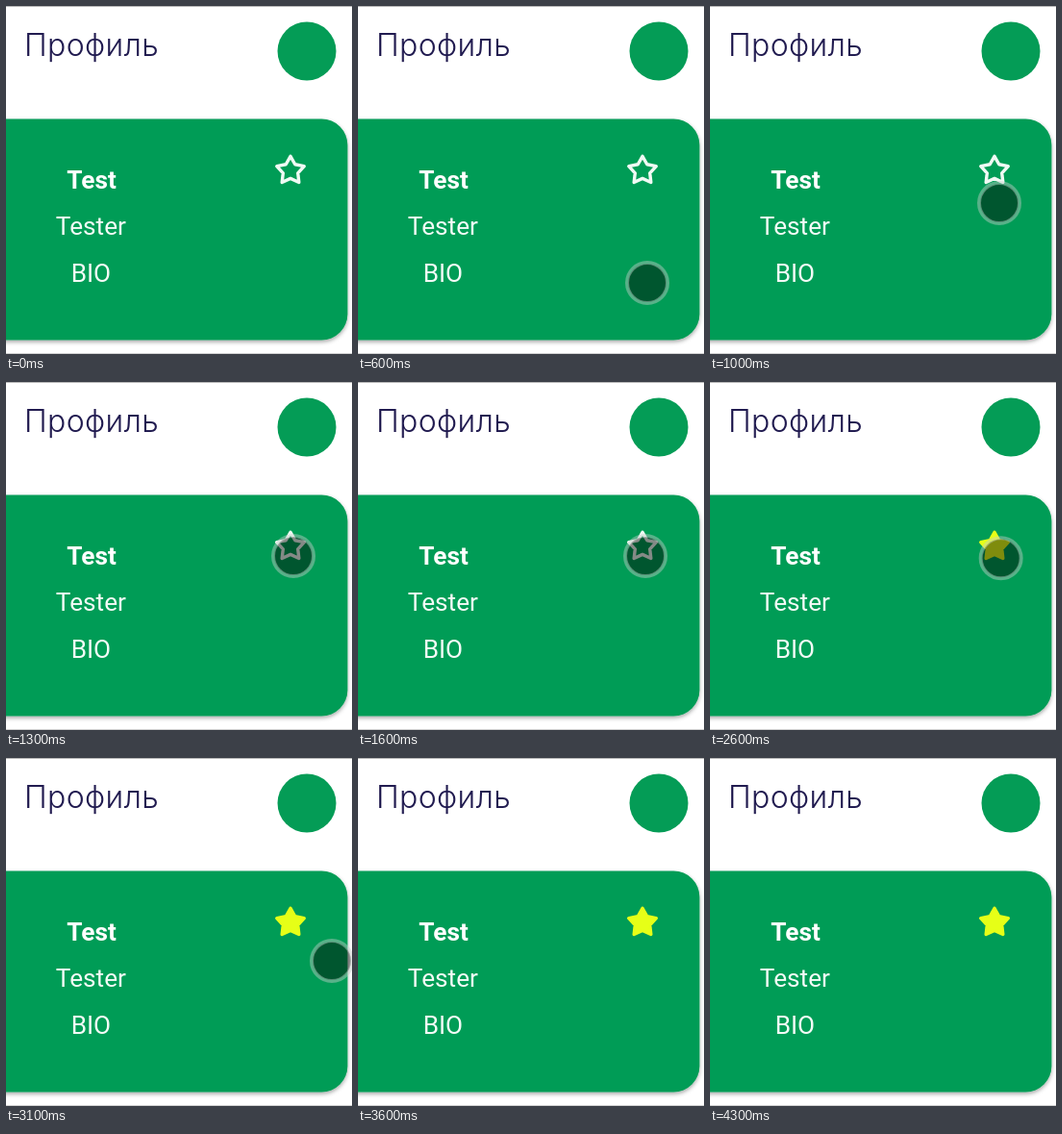
An HTML page that plays this animation: 360 px wide and 362 px high, repeating every 4.5 s.

```html
<!DOCTYPE html>
<html lang="ru">
<head>
<meta charset="utf-8">
<title>Профиль</title>
<style>
  html, body { margin: 0; width: 100%; height: 100%; overflow: hidden; background: #fff; }
  svg { display: block; width: 100%; height: 100%; }
  .title { font: 300 32px Inter, sans-serif; letter-spacing: .4px; fill: #211b50; }
  .info { font: 400 26.2px Roboto, sans-serif; fill: #f4fbf7; text-anchor: middle; }
  .name { font-weight: 700; fill: #fff; }
</style>
</head>
<body>
<svg viewBox="0 0 360 362">
  <defs>
    <filter id="shadow" x="-10%" y="-10%" width="120%" height="120%">
      <feDropShadow dx="0" dy="2" stdDeviation="2" flood-color="#000" flood-opacity=".35"/>
    </filter>
  </defs>
  <rect width="360" height="362" fill="#fff"/>
  <rect width="360" height="1" fill="#bdbdbd"/>
  <rect y="361" width="360" height="1" fill="#d4d4d4"/>
  <text class="title" x="19" y="52">Профиль</text>
  <circle cx="313" cy="47" r="30.5" fill="#049c56"/>
  <rect x="-40" y="117.5" width="395.4" height="230" rx="27" fill="#049c56" filter="url(#shadow)"/>
  <g class="info">
    <text class="name" x="89" y="190">Test</text>
    <text x="88.4" y="238">Tester</text>
    <text x="88.4" y="287">BIO</text>
  </g>
  <path id="star" stroke-width="3.4" stroke-linejoin="round"/>
  <g id="pointer">
    <circle r="20" fill="#000" fill-opacity=".45"/>
    <circle r="21" fill="none" stroke="#c4ccc8" stroke-opacity=".45" stroke-width="4"/>
  </g>
</svg>
<script>
const LOOP = 4500, STEP = 100, TOGGLE = 2000;
const star = document.getElementById('star');
const pointer = document.getElementById('pointer');

// time, x, y of the touch pointer
const path = [
  [300, 384, 296], [400, 355, 297], [500, 322, 296], [600, 301, 288],
  [800, 302, 250], [1000, 301, 205], [1200, 299, 183], [1300, 299, 181],
  [2500, 299, 181], [2800, 310, 188], [3100, 339, 211], [3400, 384, 244]
];

function starPath(cx, cy, outer, inner) {
  const points = Array.from({ length: 10 }, (_, i) => {
    const r = i % 2 ? inner : outer, a = i * Math.PI / 5 - Math.PI / 2;
    return (cx + r * Math.cos(a)).toFixed(2) + ' ' + (cy + r * Math.sin(a)).toFixed(2);
  });
  return 'M' + points.join('L') + 'Z';
}

function position(t) {
  const i = path.findIndex(p => p[0] > t);
  if (i < 1) return null;
  const [t0, x0, y0] = path[i - 1], [t1, x1, y1] = path[i];
  const k = (t - t0) / (t1 - t0);
  return [x0 + (x1 - x0) * k, y0 + (y1 - y0) * k];
}

function draw(time) {
  const t = Math.floor(time % LOOP / STEP) * STEP;
  const marked = t >= TOGGLE;
  star.setAttribute('fill', marked ? '#e6ff17' : 'none');
  star.setAttribute('stroke', marked ? '#e6ff17' : '#f0faf4');
  const p = position(t);
  pointer.style.display = p ? '' : 'none';
  if (p) pointer.setAttribute('transform', `translate(${p[0]} ${p[1]})`);
}

star.setAttribute('d', starPath(296, 171.3, 15, 8.1));
const start = performance.now();
function tick() {
  draw(performance.now() - start);
  requestAnimationFrame(tick);
}
tick();
</script>
</body>
</html>
```
